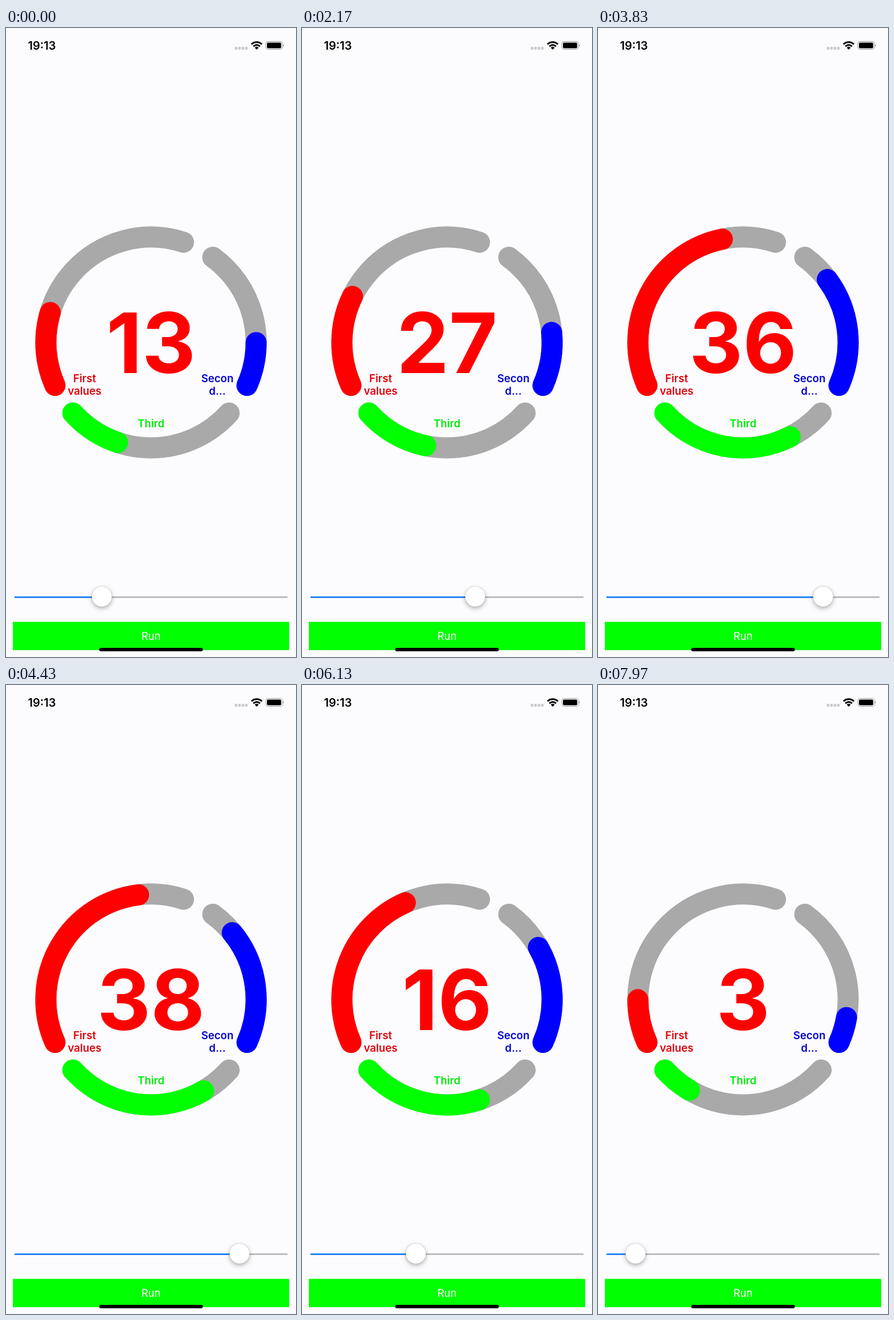
Write an HTML page that moves like this. It is 509x1101 px and loops after 7990 ms.

```html
<!DOCTYPE html>
<html lang="en">
<head>
<meta charset="utf-8">
<style>
  html, body { margin: 0; width: 100%; height: 100%; overflow: hidden; background: #fcfcfe; }
  svg { display: block; width: 509px; height: 1101px; font: 600 18.6px Inter, sans-serif; }
  text { text-anchor: middle; }
  .ring { fill: none; stroke-width: 37; stroke-linecap: round; }
  #thumb { fill: #fff; filter: drop-shadow(0 3px 4px #0004) drop-shadow(0 0 1px #0003); }
</style>
</head>
<body>
<svg viewBox="0 0 509 1101">
  <text x="63" y="37.5" font-size="20">19:13</text>
  <g fill="#cbcbcd">
    <rect x="401.5" y="33" width="4.5" height="5" rx="1"/>
    <rect x="407.5" y="33" width="4.5" height="5" rx="1"/>
    <rect x="413.5" y="33" width="4.5" height="5" rx="1"/>
    <rect x="419.5" y="33" width="4.5" height="5" rx="1"/>
  </g>
  <g fill="none" stroke="#000" stroke-width="3">
    <path d="M430.8 28.5a13 13 0 0 1 18.4 0M434.2 32.2a8.2 8.2 0 0 1 11.6 0"/>
    <path d="M440 38l-3.4-3.5a4.8 4.8 0 0 1 6.8 0z" fill="#000" stroke="none"/>
  </g>
  <rect x="456" y="23.5" width="29" height="14" rx="4" fill="none" stroke="#999"/>
  <rect x="458" y="25.5" width="25" height="10" rx="2.3"/>
  <path d="M486.5 28q3 2.5 0 5z" fill="#999"/>

  <g id="rings"></g>
  <text id="count" x="254.5" y="603.5" font-size="146" font-weight="700" fill="#f00"></text>
  <g fill="#e3000b"><text x="138" y="620">First</text><text x="138" y="641.5">values</text></g>
  <g fill="#0000d8"><text x="371" y="620">Secon</text><text x="371" y="641.5">d...</text></g>
  <text x="254.5" y="698.5" fill="#00ea08">Third</text>

  <g stroke-width="2.6" stroke-linecap="round">
    <path d="M16 996.3H493" stroke="#b3b3b5"/>
    <path id="fill" stroke="#0a78ff"/>
  </g>
  <circle id="thumb" cy="995.3" r="17.4"/>
  <rect x="12" y="1039.5" width="485" height="49.5" fill="#0f0"/>
  <text x="254.5" y="1071" font-weight="400" fill="#fff">Run</text>
  <rect x="163.5" y="1085" width="182" height="6" rx="3"/>
</svg>
<script>
const LOOP = 7990, CX = 254.5, CY = 550.5, R = 184.5;
const $ = id => document.getElementById(id);

// [time in ms, value 0..1]; the rings trail behind the slider
const sliderKeys = [[0, .306], [1260, .306], [2170, .611], [3170, .755], [4430, .849],
  [5150, .86], [6130, .3775], [6850, .173], [7970, .076]];
const ringKeys = [[0, .307], [1260, .307], [2170, .378], [2870, .615], [3170, .702], [3730, .77],
  [4430, .812], [5350, .85], [6130, .687], [6850, .42], [7970, .181]];

// Monotone cubic interpolation through the keys
function sample(keys, t) {
  const last = keys.length - 1;
  if (t >= keys[last][0]) return keys[last][1];
  const slope = i => (keys[i + 1][1] - keys[i][1]) / (keys[i + 1][0] - keys[i][0]);
  const tangent = i => {
    if (i === 0) return slope(0);
    if (i === last) return slope(last - 1);
    const a = slope(i - 1), b = slope(i);
    return a * b > 0 ? 2 * a * b / (a + b) : 0;
  };
  const i = keys.findIndex(k => k[0] > t) - 1;
  const [t0, v0] = keys[i], [t1, v1] = keys[i + 1];
  const h = t1 - t0, u = (t - t0) / h, w = 1 - u;
  return v0 * w * w * (1 + 2 * u) + v1 * u * u * (3 - 2 * u)
    + h * u * w * (tangent(i) * w - tangent(i + 1) * u);
}

const point = deg => {
  const a = deg * Math.PI / 180;
  return `${CX + R * Math.cos(a)} ${CY + R * Math.sin(a)}`;
};
const arc = (start, sweep) =>
  `M${point(start)}A${R} ${R} 0 0 ${sweep > 0 ? 1 : 0} ${point(start + sweep)}`;

function addRing(color, d) {
  const path = document.createElementNS('http://www.w3.org/2000/svg', 'path');
  path.setAttribute('class', 'ring');
  path.setAttribute('stroke', color);
  path.setAttribute('d', d);
  return $('rings').appendChild(path);
}

const rings = [['#f00', 156, 132], ['#00f', 24, -78], ['#0f0', 138, -96]].map(([color, start, sweep]) => {
  addRing('#a9a9a9', arc(start, sweep));
  return { start, sweep, path: addRing(color, '') };
});

function draw(now) {
  const t = now % LOOP;
  const value = sample(sliderKeys, t), level = sample(ringKeys, t);
  const x = 32 + 445 * value;
  for (const { start, sweep, path } of rings) path.setAttribute('d', arc(start, sweep * level));
  $('count').textContent = Math.floor(value * 45);
  $('thumb').setAttribute('cx', x);
  $('fill').setAttribute('d', `M16 996.3H${x}`);
}

const begin = performance.now();
function tick() {
  draw(performance.now() - begin);
  requestAnimationFrame(tick);
}
tick();
</script>
</body>
</html>
```
